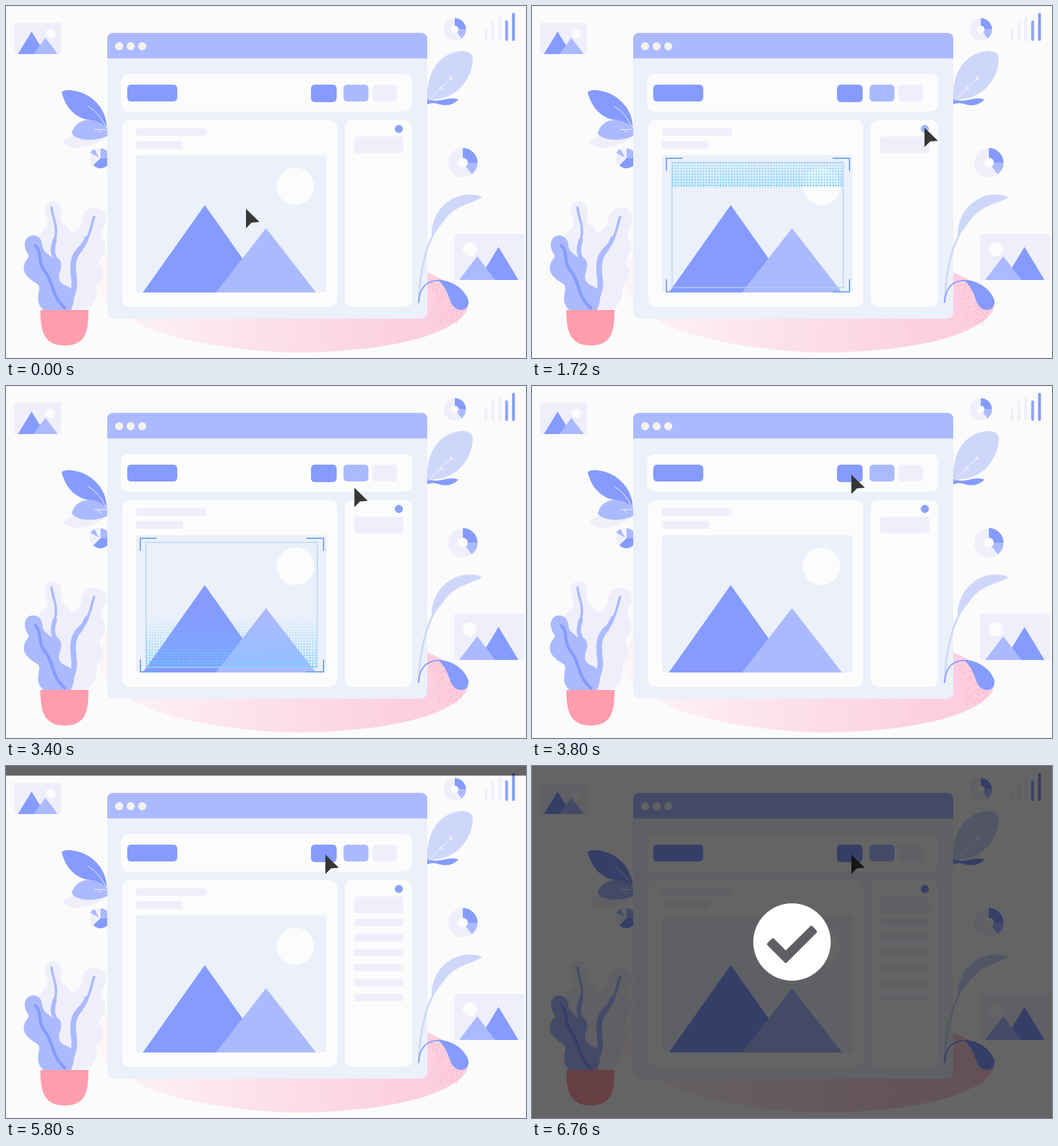
Animation of 832x564 px, one loop 8080 ms. Source, as an HTML page:

```html
<!DOCTYPE html>
<html lang="en">
<head>
<meta charset="utf-8">
<title>Image scan</title>
<style>
  html, body { margin: 0; width: 100%; height: 100%; overflow: hidden; background: #fbfbfb; }
  svg { display: block; width: 832px; height: 564px; }
  .dark { fill: #859bff; }
  .mid { fill: #abbaff; }
  .soft { fill: #ced7fa; }
  .light { fill: #efeffc; }
  .frost { fill: #ebf0fa; }
  .paper { fill: #fcfcfc; }
  .line { fill: none; stroke-linecap: round; }
</style>
</head>
<body>
<svg viewBox="0 0 832 564">
  <defs>
    <linearGradient id="blush" gradientUnits="userSpaceOnUse" x1="145" x2="640" y1="0" y2="0">
      <stop offset="0" stop-color="#fdf5f5"/>
      <stop offset="1" stop-color="#fccfe0"/>
    </linearGradient>
    <linearGradient id="fade" x2="0" y2="1">
      <stop offset="0" stop-color="#fff" stop-opacity="0"/>
      <stop offset=".5" stop-color="#fff" stop-opacity=".5"/>
      <stop offset="1" stop-color="#fff"/>
    </linearGradient>
    <pattern id="mesh" x="224.5" y="251" width="4.5" height="4.5" patternUnits="userSpaceOnUse">
      <path d="M0 .5H4.5M.5 0V4.5" stroke="#69cbff" fill="none"/>
    </pattern>
    <mask id="beamMask" maskUnits="userSpaceOnUse" x="0" y="0" width="832" height="564">
      <rect id="beam" x="224" width="274" height="80" fill="url(#fade)"/>
    </mask>
  </defs>

  <path fill="url(#blush)" d="M674 427Q738 452 738 487C715 530 600 555 463 555C360 554 240 530 197 501Q145 470 148 445Q150 420 162 395Z"/>
  <g id="speckles" fill="#ff9dad"></g>

  <!-- leaves behind the window -->
  <path class="light" d="M92 218Q105 203 125 207Q145 212 162 209Q138 226 115 228Q97 226 92 218Z"/>
  <path class="dark" d="M161 196C163 170 140 138 104 135Q94 134 89 138C92 150 100 172 125 181Q150 186 161 196Z"/>
  <path class="mid" d="M162 196C144 176 112 178 105 204C112 216 144 218 162 208Z"/>
  <path class="line" stroke="#fbfbfb" d="M132 161Q150 172 160 194M142 198H161M146 198L152 203"/>
  <path class="soft" d="M674 150C672 110 690 75 730 72Q747 73 747 85C745 120 720 146 690 149Q680 149 674 156Z"/>
  <path class="dark" d="M673 149Q685 154 700 150Q715 146 724 150Q712 162 695 158Q682 153 673 158Z"/>
  <path class="line" stroke="#fbfbfb" d="M676 152Q695 131 714 114M711 117V112M711 117H716M695 133V128M694 134H701"/>

  <!-- potted plant -->
  <path class="light" d="M62 326C62 309 88 309 89 327C89 342 84 345 94 351C104 357 101 366 108 362C118 357 120 352 122 338C126 318 160 318 160 340C160 355 148 358 156 375C162 390 158 395 152 405C146 415 158 420 155 432C150 448 146 440 145 455C145 475 135 487 118 487H60V400C48 380 50 365 62 357C72 348 62 340 62 326Z"/>
  <path class="mid" d="M30 384C29 363 56 362 58 382C59 394 64 394 72 402C84 400 90 408 88 420C82 436 84 444 98 449C110 455 112 470 104 487H60C50 478 50 470 53 455C55 443 46 446 36 435C25 425 27 412 36 403C38 398 31 395 30 384Z"/>
  <g class="line" stroke="#abbaff">
    <path stroke-width="4" d="M73 323C74 340 83 350 79 370C74 390 72 395 82 410M141 338C136 352 135 370 120 388"/>
    <path stroke-width="7" d="M129 372Q126 381 117 391M78 375C73 392 74 398 82 410"/>
    <path stroke-width="9" d="M119 389C104 404 107 420 109 440Q111 460 96 480"/>
    <path stroke="#859bff" stroke-width="5" d="M47 384C58 394 50 410 62 425C76 440 72 465 94 484"/>
  </g>
  <path fill="#ff9dad" d="M55 487H132C132 520 128 544 94 544C60 544 55 520 55 487Z"/>

  <!-- charts and thumbnails -->
  <g id="charts"></g>
  <rect class="light" x="13" y="27" width="75" height="50" rx="2"/>
  <circle class="paper" cx="71" cy="44" r="7.5"/>
  <path class="dark" d="M19 77L41 41L63 77Z"/>
  <path class="mid" d="M44 77L63 51L83 77Z"/>
  <rect class="light" x="717" y="365" width="112" height="74" rx="2"/>
  <circle class="paper" cx="742" cy="390" r="11"/>
  <path class="dark" d="M756 439L788 386L820 439Z"/>
  <path class="mid" d="M725 439L754 401L783 439Z"/>

  <!-- browser window -->
  <rect class="frost" x="162" y="43" width="512" height="458" rx="10"/>
  <path class="mid" d="M162 84V53Q162 43 172 43H664Q674 43 674 53V84Z"/>
  <g fill="#f5f2f0">
    <circle cx="181" cy="64.5" r="6.5"/><circle cx="199.5" cy="64.5" r="6.5"/><circle cx="218" cy="64.5" r="6.5"/>
  </g>
  <g class="paper">
    <rect x="184" y="109" width="466" height="60" rx="12"/>
    <rect x="186" y="183" width="344" height="299" rx="12"/>
    <rect x="542" y="183" width="108" height="299" rx="12"/>
  </g>
  <rect class="dark" x="194" y="126" width="80" height="27" rx="6"/>
  <rect class="dark" id="button" x="488" y="126" width="41" height="28" rx="6"/>
  <rect class="mid" x="540" y="126" width="40" height="27" rx="6"/>
  <g class="light">
    <rect x="586" y="126" width="40" height="27" rx="6"/>
    <rect x="208" y="196" width="112" height="12" rx="4"/>
    <rect x="208" y="216" width="75" height="13" rx="4"/>
    <rect x="557" y="209" width="79" height="27" rx="5"/>
    <g id="rows"></g>
  </g>
  <circle id="dot" cx="628.5" cy="197" r="6.5"/>
  <rect class="frost" x="208" y="239" width="305" height="220" rx="5"/>
  <circle class="paper" cx="463" cy="289" r="30"/>
  <path class="dark" d="M219 459L318 319L417 459Z"/>
  <path class="mid" d="M336 459L416 356L496 459Z"/>

  <g id="scanner" class="line">
    <rect x="224" y="250.5" width="274" height="200.5" stroke="#b3d0f7" stroke-width="1.4"/>
    <path stroke="#70a6f2" stroke-width="2" stroke-linecap="butt" d="M215 264V244H241M481 244H508V264M215 438V458H241M481 458H508V438"/>
    <rect x="224" y="251" width="274" height="200" fill="url(#mesh)" mask="url(#beamMask)"/>
  </g>

  <!-- plants in front of the window -->
  <path class="line" stroke="#ced7fa" stroke-width="3" d="M661 474C660 440 670 390 684 366"/>
  <path class="soft" d="M681 371C679 330 710 300 745 302Q758 303 762 307C740 318 720 320 704 340Q692 355 681 371Z"/>
  <path class="line" stroke="#859bff" stroke-width="2" d="M660 475C662 445 680 438 697 440"/>
  <path class="dark" d="M691 439C715 439 735 455 740 472Q741 487 727 487Q715 486 710 470Q703 448 691 439Z"/>

  <path id="cursor" fill="#363636" d="M0 0L21.5 21L9 22L0 31Z"/>
  <rect id="shade" width="832" fill-opacity=".6"/>
  <g id="done">
    <circle r="62" fill="#fff"/>
    <path fill="#5f5f63" stroke="#5f5f63" stroke-width="5" stroke-linejoin="round" d="M-37.5 3.5L-30.5 -3.5L-10 17L31 -23.5L37.5 -16.5L-10 31Z"/>
  </g>
</svg>
<script>
const LOOP = 8080;
const $ = id => document.getElementById(id);
const clamp = x => Math.min(1, Math.max(0, x));
const span = (t, start, length) => clamp((t - start) / length);
const smooth = x => (1 - Math.cos(Math.PI * x)) / 2;

function add(parent, tag, attrs) {
  const node = document.createElementNS('http://www.w3.org/2000/svg', tag);
  for (const key in attrs) node.setAttribute(key, attrs[key]);
  return parent.appendChild(node);
}

// Pie slice; angles in degrees clockwise from the top.
function slice(x, y, r, from, to, cls) {
  const point = a => [x + r * Math.sin(a * Math.PI / 180), y - r * Math.cos(a * Math.PI / 180)];
  const d = `M${x} ${y}L${point(from)}A${r} ${r} 0 ${+(to - from > 180)} 1 ${point(to)}Z`;
  add($('charts'), 'path', { d, class: cls });
}

function donut(x, y, r) {
  slice(x, y, r, 143, 360, 'light');
  slice(x, y, r, 0, 90, 'dark');
  slice(x, y, r, 90, 143, 'mid');
  add($('charts'), 'circle', { cx: x, cy: y, r: r / 3, class: 'paper' });
}

donut(718, 37.5, 18);
donut(731, 251, 23.5);
slice(151, 244, 16, 0, 90, 'mid');
slice(151, 244, 16, 90, 225, 'dark');
slice(150, 244, 16, 225, 295, 'light');
slice(149, 243, 16, 298, 332, 'mid');
slice(150, 243, 16, 335, 357, 'light');

[36, 24, 17, 23, 11].forEach((y, i) => add($('charts'), 'rect', {
  x: 765.7 + 11 * i, y, width: 4.6, height: 56 - y, rx: 2.3,
  class: i < 3 ? 'light' : 'dark', opacity: i === 3 ? .9 : 1
}));

let seed = 7;
const random = () => (seed = seed * 16807 % 2147483647) / 2147483647;
for (let i = 0; i < 190; i++) {
  const y = 443 + 67 * random();
  const left = 679 + (y - 443) * .22;
  const right = Math.min(734, 700 + (y - 443) * .9, 734 - (y - 490) * .7);
  add($('speckles'), 'circle', { cx: left + (right - left) * random(), cy: y, r: .6 });
}

const rows = Array.from({ length: 6 }, (_, i) =>
  add($('rows'), 'rect', { x: 557, y: 245 + 24 * i, width: 79, height: 12, rx: 4 }));

function draw(t) {
  const toDot = smooth(span(t, 40, 920));
  const toButton = smooth(span(t, 2880, 920));
  const x = 384 + 244 * toDot - 117 * toButton;
  const y = 325 - 130 * toDot - 53 * toButton;
  $('cursor').setAttribute('transform', `translate(${x} ${y})`);
  $('dot').setAttribute('fill', t > 960 && t < 2880 ? '#a3b6fb' : '#8aa3fa');

  $('scanner').setAttribute('opacity', span(t, 20, 300) * (1 - span(t, 3420, 240)));
  const beamEnd = Math.min(451, 251 + .107 * (t - 1353));
  $('beam').setAttribute('y', beamEnd - 80);

  rows.forEach((row, i) => row.setAttribute('opacity', span(t, 4050 + 250 * i, 200)));

  const scale = 1 - .235 * Math.sin(Math.PI * span(t, 4640, 560)) ** 2;
  $('button').setAttribute('transform', `translate(508.5 140) scale(${scale}) translate(-508.5 -140)`);

  $('shade').setAttribute('height', 564 * span(t, 5788, 475));
  const pop = 1 - (1 - span(t, 6410, 350)) ** 2;
  $('done').setAttribute('transform', `translate(416 282) scale(${pop})`);
}

function tick() {
  draw(performance.now() % LOOP);
  requestAnimationFrame(tick);
}
tick();
</script>
</body>
</html>
```
